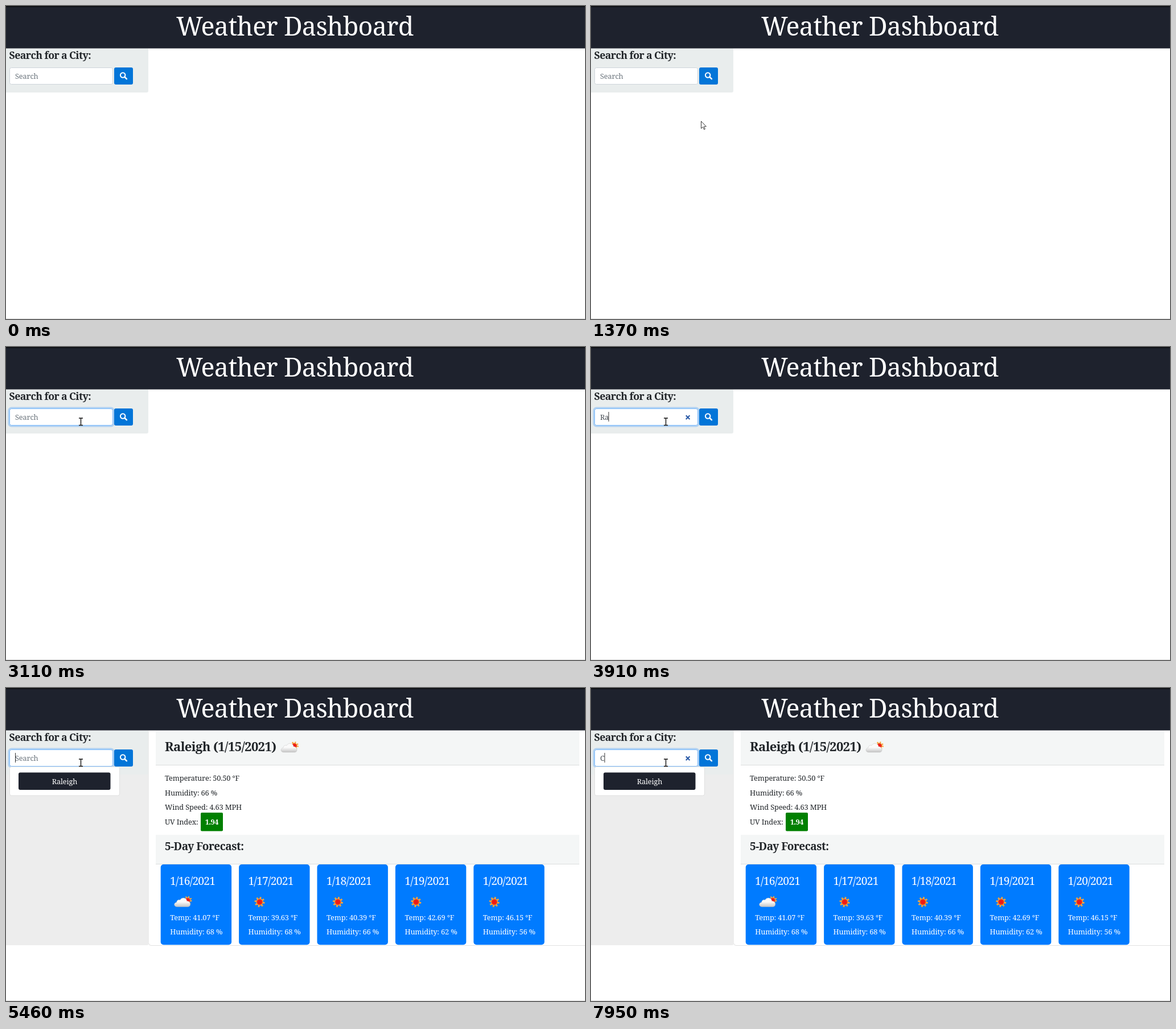
These frames come from a looping animation (1017 by 550 pixels, 8 s). An HTML page:

```html
<!DOCTYPE html>
<html lang="en">
<head>
<meta charset="utf-8">
<title>Weather Dashboard</title>
<style>
  html, body { margin: 0; width: 100%; height: 100%; overflow: hidden; background: #fff; }
  svg { display: block; }
  text { font: 12.8px "Noto Serif", serif; letter-spacing: -.012em; fill: #212529; white-space: pre; }
  .title { font-size: 44.8px; letter-spacing: -.015em; fill: #fff; }
  .city { font-size: 22px; font-weight: 600; letter-spacing: -.025em; }
  .head { font-size: 19px; font-weight: 600; letter-spacing: -.025em; }
  .label { font-size: 17.8px; font-weight: 600; letter-spacing: -.035em; }
  .date { font-size: 19.2px; letter-spacing: -.04em; }
  .card text, .light { fill: #fff; }
  .mid { text-anchor: middle; }
</style>
</head>
<body>
<svg width="1017" height="550" viewBox="0 0 1017 550">
  <defs>
    <linearGradient id="puff" x2="0" y2="1">
      <stop offset=".45" stop-color="#fafafa"/><stop offset="1" stop-color="#c4c4c4"/>
    </linearGradient>
    <radialGradient id="glow">
      <stop offset=".5" stop-color="#f01818"/><stop offset="1" stop-color="#e84a1c"/>
    </radialGradient>
    <g id="sun">
      <circle r="7.3" fill="none" stroke="#f6a53a" stroke-width="3.4" stroke-dasharray="2.6 3.13"/>
      <circle r="6.3" fill="#f8b04a"/>
      <circle r="5.3" fill="url(#glow)"/>
    </g>
    <g id="cloud">
      <use href="#sun" transform="translate(23.5 7.5) scale(.82)"/>
      <path d="M5 19C-1 19-2 12 4 11C4 7 8 6 10 7C13 1 22 3 22 9C28 8 31 18 24 19Z" fill="url(#puff)" stroke="#bbb" stroke-width=".4"/>
    </g>
  </defs>

  <rect width="1017" height="74.5" fill="#1e222d"/>
  <rect width="1017" height="2" fill="#0e1015"/>
  <text class="title" x="299" y="52">Weather Dashboard</text>
  <path d="M0 549.5H1017" stroke="#dcdcdc"/>

  <path id="side" d="M0 75H251V448Q251 452 247 452H0Z" fill="#ededed"/>
  <path d="M0 75H250V149Q250 152 247 152H0Z" fill="#e9eded"/>
  <text class="label" x="5.5" y="93">Search for a City:</text>
  <rect x="6.5" y="108.5" width="181" height="29" rx="3" fill="#fff" stroke="#ced4da"/>
  <g id="focus" fill="none">
    <rect x="4.8" y="106.8" width="184.4" height="32.4" rx="4.5" stroke="#007bff" stroke-opacity=".25" stroke-width="2.6"/>
    <rect x="6.5" y="108.5" width="181" height="29" rx="3" stroke="#80bdff"/>
  </g>
  <text id="field" x="16" y="127.5"></text>
  <rect id="caret" y="114" width="1" height="17" fill="#333"/>
  <path id="clear" d="M166.8 120.3l6.6 6.8m0-6.8l-6.6 6.8" stroke="#2c5ca8" stroke-width="2.2"/>
  <rect x="190" y="108" width="33" height="30" rx="3" fill="#0275d8"/>
  <g fill="none" stroke="#fff" stroke-width="2.1">
    <circle cx="205.2" cy="121.5" r="4.2"/>
    <path d="M208.3 124.6l3.6 3.6" stroke-width="2.6" stroke-linecap="round"/>
  </g>

  <g id="results">
    <rect x="6.5" y="138.5" width="193" height="50.5" rx="3" fill="#fff" stroke="#e0e0e0"/>
    <rect x="22" y="148.5" width="161.5" height="30.5" rx="3" fill="#1e222d"/>
    <text class="light mid" x="103" y="168.5">Raleigh</text>
    <path d="M251 449Q251 452.5 255 452.5H1017" fill="none" stroke="#e2e2e2"/>
    <path d="M263 75H1007V135H263ZM263 258H1007V309H263Z" fill="#f4f6f6"/>
    <path d="M263 135.5H1007M263 309.5H1007" stroke="#dcdede"/>
    <text class="city" x="279" y="111">Raleigh (1/15/2021)</text>
    <use href="#cloud" x="483" y="94"/>
    <text x="279" y="163">Temperature: 50.50 °F</text>
    <text x="279" y="188.7">Humidity: 66 %</text>
    <text x="279" y="214.4">Wind Speed: 4.63 MPH</text>
    <text x="279" y="240">UV Index:</text>
    <rect x="342" y="219" width="39" height="32.5" rx="2" fill="#008000"/>
    <text class="light mid" x="361.3" y="240" font-weight="700" style="font-weight:700;letter-spacing:-.04em">1.94</text>
    <text class="head" x="279" y="284.5">5-Day Forecast:</text>
    <g id="cards"></g>
  </g>

  <path id="arrow" d="M.5.5V13.2L3.5 10.5L5.6 15L7.4 14.2L5.4 9.8H9.4Z" fill="#fff" stroke="#222" stroke-width=".9"/>
  <path id="beam" d="M-3.5-6H-.8L0-5.4L.8-6H3.5M0-5.4V5.9M-3.5 6.5H-.8L0 5.9L.8 6.5H3.5" fill="none" stroke="#111" stroke-width="1.4"/>
</svg>
<script>
const $ = id => document.getElementById(id);
const show = (id, on) => $(id).style.display = on ? '' : 'none';
const place = (id, x, y) => $(id).setAttribute('transform', `translate(${x} ${y})`);

// Last value whose start time has been reached.
const at = (steps, t) => steps.filter(s => s[0] <= t).pop().slice(1);

const forecast = [[41.07, 68], [39.63, 68], [40.39, 66], [42.69, 62], [46.15, 56]];
$('cards').innerHTML = forecast.map(([temp, humidity], i) => `
  <g class="card" transform="translate(${271.7 + i * 137.4} 310)">
    <rect width="124.4" height="141.3" rx="5" fill="#007bff"/>
    <text class="date" x="16.3" y="35.5">1/${16 + i}/2021</text>
    ${i ? '<use href="#sun" x="36.4" y="66"/>' : '<use href="#cloud" x="24" y="55.5"/>'}
    <text x="16.5" y="97.7">Temp: ${temp.toFixed(2)} °F</text>
    <text x="16.5" y="123.4">Humidity: ${humidity} %</text>
  </g>`).join('');

const pointer = [[0, ''], [290, 'arrow', 482, 391], [440, 'arrow', 464, 380.5],
  [1370, 'arrow', 193, 202], [1540, 'arrow', 172, 173], [1700, 'arrow', 152, 148],
  [1860, 'beam', 138, 135], [2020, 'beam', 133, 132], [2180, 'beam', 131.5, 131]];
const focus = [[0, 0], [2500, .4], [2650, .9], [2810, 1]];
const typed = [[0, ''], [3750, 'R'], [3910, 'Ra'], [4210, 'Ral'], [4370, 'Rale'],
  [4530, 'Ralei'], [4840, 'Raleigh'], [5460, ''], [7950, 'C']];
const caret = [[0, 0], [2500, 1], [3110, 0], [3590, 1], [5920, 0], [6380, 1], [6990, 0], [7470, 1]];

function draw(now) {
  const t = now % 8000;
  const done = t >= 5460;
  show('side', done);
  show('results', done);

  const [kind, x, y] = at(pointer, t);
  for (const id of ['arrow', 'beam']) show(id, id === kind);
  if (kind) place(kind, x, y);

  const [text] = at(typed, t);
  const field = $('field');
  field.textContent = text || 'Search';
  field.style.fill = text ? '#495057' : '#6c757d';
  show('clear', text);
  show('caret', at(caret, t)[0]);
  $('caret').setAttribute('x', 16 + (text ? Math.round(field.getComputedTextLength()) - .5 : 0));
  $('focus').style.opacity = at(focus, t)[0];
  requestAnimationFrame(draw);
}
requestAnimationFrame(draw);
</script>
</body>
</html>
```
